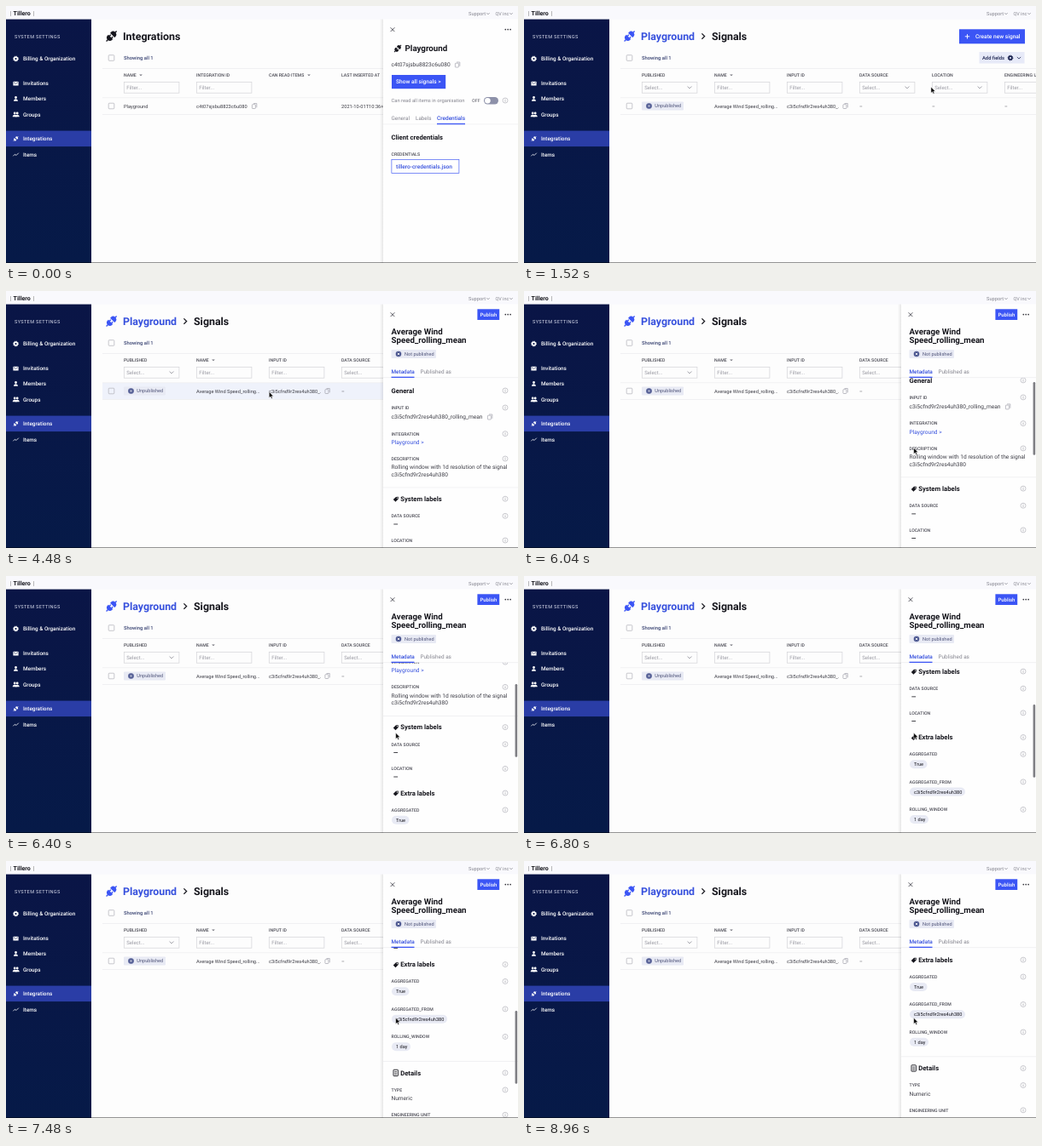
An HTML page for the animation above (9000 ms loop, 600 by 302 pixels).

```html
<!DOCTYPE html>
<html lang="en">
<head>
<meta charset="utf-8">
<title>Publishing a signal</title>
<style>
  html, body { margin: 0; width: 100%; height: 100%; overflow: hidden; background: #fdfdfd; }
  svg { display: block; width: 100vw; height: 100vh; }
  text { font-family: Roboto, Arial, sans-serif; text-rendering: geometricPrecision; white-space: pre; }
</style>
</head>
<body>
<svg id="stage" viewBox="0 0 600 302"></svg>
<script>
const LOOP = 9000, PANEL_X = 442, PANEL_W = 158;
const BLUE = '#3b55f5', LINK = '#3650dd', INK = '#16161d', BODY = '#3d3d46', GREY = '#85858f', RULE = '#ebebee', CHIP = '#e8eaf4';

// ---- drawing helpers (y is the vertical middle of the capitals) ----
const text = (x, y, str, size = 5.7, fill = BODY, weight = 400, spacing = 0) =>
  `<text x="${x}" y="${y + size * 0.355}" font-size="${size}" fill="${fill}" font-weight="${weight}" letter-spacing="${spacing}">${str.replace(/&/g, '&amp;').replace(/>/g, '&gt;')}</text>`;
const rect = (x, y, w, h, fill, extra = '') =>
  `<rect x="${x}" y="${y}" width="${w}" height="${h}" fill="${fill}" ${extra}/>`;
const box = (x, y, w, h, stroke, width = 0.7, r = 0) =>
  rect(x, y, w, h, 'none', `stroke="${stroke}" stroke-width="${width}" rx="${r}"`);
const line = (d, stroke, width = 0.8) =>
  `<path d="${d}" fill="none" stroke="${stroke}" stroke-width="${width}"/>`;
const fillPath = (d, fill) => `<path d="${d}" fill="${fill}"/>`;
const dot = (x, y, r, fill) => `<circle cx="${x}" cy="${y}" r="${r}" fill="${fill}"/>`;
const at = (x, y, inner, scale = 1, turn = 0) =>
  `<g transform="translate(${x} ${y}) rotate(${turn}) scale(${scale})">${inner}</g>`;

const rule = (x, y, w) => rect(x, y, w, 0.7, RULE);
const label = (x, y, str) => text(x, y, str, 5.2, '#4b4b55', 500);
const chevron = (x, y, color, s = 1) => line(`M${x - 2 * s} ${y - s}l${2 * s} ${2 * s}l${2 * s} ${-2 * s}`, color);
const caret = x => fillPath(`M${x - 1.8} 80.4h3.6l-1.8 1.8z`, '#6f6f78');
const checkbox = y => box(120.2, y - 3.3, 6.6, 6.6, '#b0b0b8', 0.7, 0.8);
const cross = (x, y, r, color, w) =>
  line(`M${x - r} ${y - r}l${2 * r} ${2 * r}M${x + r} ${y - r}l${-2 * r} ${2 * r}`, color, w);
const info = y => `<circle cx="585" cy="${y}" r="3" fill="none" stroke="#a8a8b1" stroke-width=".6"/>` +
  rect(584.7, y - 0.6, 0.6, 2.2, '#8e8e99') + rect(584.7, y - 1.7, 0.6, 0.6, '#8e8e99');
const copy = (x, y) => box(x - 2.6, y - 1.8, 4, 4.8, '#a2a2ac', 0.7, 0.6) +
  line(`M${x - 1} ${y - 3}h3.8v4.8`, '#a2a2ac', 0.7);
const badge = (x, y) => dot(x, y, 3.3, '#4f5a92') + cross(x, y, 1.2, '#fff', 0.8);
const gear = (x, y, color) => `<g fill="none" stroke="${color}"><circle cx="${x}" cy="${y}" r="1.9" stroke-width="1.6"/>` +
  `<circle cx="${x}" cy="${y}" r="2.9" stroke-width="1" stroke-dasharray="1.2 1.078"/></g>`;
const plug = (x, y, color, s = 1) => at(x, y,
  fillPath('M-1.3 -3.7V3.7H-2.4A3.7 3.7 0 0 1 -2.4 -3.7Z M1.6 -3.7V3.7H2.8A3.7 3.7 0 0 0 2.8 -3.7Z', color) +
  line('M-8.4 0H-5M5.4 0H8.6M-1.6 -1.7H.7M-1.6 1.7H.7', color, 1.4), s, -45);
const tag = (x, y) => at(x, y, fillPath('M-3.2 -1.9H1.3L3.4 0L1.3 1.9H-3.2Z', INK) + dot(1.4, 0, 0.6, '#fff'), 1, -45);
const person = (x, y) => dot(x, y - 1.5, 1.4, '#fff') + fillPath(`M${x - 2.5} ${y + 2.7}a2.5 2.5 0 0 1 5 0z`, '#fff');
const field = (x, kind) => box(x + 0.3, 89.3, 64.6, 12.9, '#d3d3d8') +
  text(x + 3.2, 95.6, kind + '...', 6, '#9b9ba4') +
  (kind === 'Select' ? chevron(x + 56, 95.7, '#8b8b95', 1.2) : '');

// ---- fixed chrome ----
function chrome() {
  const items = [[62, 'Billing & Organization'], [91, 'Invitations'], [109, 'Members'], [127.5, 'Groups'], [156, 'Integrations'], [174.5, 'Items']];
  return rect(0, 0, 600, 15.6, '#f9f9fd') +
    text(4.7, 8.5, '|', 7, '#777') + text(8.6, 8.5, 'Tillero', 7, INK, 700) + text(31.8, 8.5, '|', 7, '#777') +
    text(542, 9, 'Support', 5.7, GREY) + chevron(565, 9, GREY, 0.8) +
    text(573.5, 9, 'QV inc', 5.5, GREY) + chevron(592, 9, GREY, 0.8) +
    rect(0, 15.6, 100, 286.4, 'url(#navy)') + rect(0, 146.6, 100, 18.5, '#2a3da6') +
    text(10, 36, 'SYSTEM SETTINGS', 5.6, '#d5d9ea', 400, 0.33) +
    items.map(([y, s]) => text(20, y, s, 6.36, '#fff', 500)).join('') +
    gear(11.5, 62, '#fff') +
    rect(8.4, 88.7, 6.2, 4.8, '#fff', 'rx=".5"') + line('M8.6 89.4l2.9 2l2.9 -2', '#0a1747', 0.6) +
    person(11.5, 109) + person(10.2, 127.5) + person(13.2, 127.5) +
    plug(11.5, 156, '#fff', 0.46) + line('M8.4 176.3l2 -2l1.6 1.2l2.8 -2.8', '#fff', 0.8);
}

const tableFrame = () => checkbox(61) + text(138, 60.9, 'Showing all 1', 5.8, '#3c4674', 500) +
  rule(113, 73, 487) + rule(113, 107.5, 487) + rule(113, 127.2, 487) + checkbox(117.5);
const column = (x, str) => label(x, 81.3, str);

function integrationsPage() {
  return plug(123.5, 35.5, INK) + text(137, 35.5, 'Integrations', 12.4, INK, 700) + tableFrame() +
    column(138, 'NAME') + caret(158) + column(223, 'INTEGRATION ID') +
    column(308, 'CAN READ ITEMS') + caret(355) + column(393, 'LAST INSERTED AT') +
    field(138, 'Filter') + field(223, 'Filter') +
    text(138, 117.5, 'Playground') + text(223, 117.5, 'c4t07sjsbu8823c6u080') + copy(291, 117.5) +
    text(393, 117.5, '2021-10-01T10:36+02:00');
}

function signalsPage() {
  const heads = ['PUBLISHED', 'NAME', 'INPUT ID', 'DATA SOURCE', 'LOCATION', 'ENGINEERING UNIT'];
  const kinds = ['Select', 'Filter', 'Filter', 'Select', 'Select', 'Filter'];
  return rect(113, 108, 487, 19.2, '#eff2fb', 'id="hover"') +
    plug(123.5, 35.5, BLUE) + text(137, 35.5, 'Playground', 12.35, LINK, 700) +
    line('M208.4 32.4l3.2 3.2l-3.2 3.2', INK, 1.3) + text(220, 35.5, 'Signals', 12.4, INK, 700) +
    rect(510, 27.3, 77, 17, BLUE) + line('M516.8 35.8h5.4M519.5 33.1v5.4', '#fff', 0.9) +
    text(529, 35.8, 'Create new signal', 6.6, '#fff', 500) +
    rect(533.5, 54, 53, 13.5, '#e7eaf8') + text(537, 60.8, 'Add fields', 5.8, '#1b2350', 500) +
    gear(570, 61, '#1b2350') + chevron(580, 61, '#1b2350', 1.1) + tableFrame() +
    heads.map((h, i) => column(138 + 85 * i, h) + field(138 + 85 * i, kinds[i])).join('') + caret(243) +
    rect(138, 112.5, 49, 10, CHIP, 'rx="1"') + badge(146.5, 117.5) + text(153.3, 117.5, 'Unpublished', 5.6, '#50557a') +
    text(223, 117.5, 'Average Wind Speed_rolling...') + text(308, 117.5, 'c3i5cfnd9r2res4uh380_.') + copy(376.5, 117.5) +
    [393, 478, 563].map(x => text(x, 117.5, '–')).join('');
}

// ---- side panels ----
const panelBase = () => rect(PANEL_X - 4, 15.6, 4, 286.4, 'url(#shade)') + rect(PANEL_X, 15.6, PANEL_W, 286.4, '#fefefe') +
  cross(453, 27.7, 2.4, '#33333b', 0.8) + [585.3, 588.2, 591.1].map(x => dot(x, 27.6, 0.85, '#33333b')).join('');

function integrationPanel() {
  return panelBase() + plug(459, 50, INK, 0.68) + text(467.5, 49.8, 'Playground', 9.75, INK, 700) +
    text(451.5, 69, 'c4t07sjsbu8823c6u080', 6.6) + copy(529, 69) +
    rect(452, 81, 63.2, 16.2, BLUE) + text(457, 89, 'Show all signals >', 6.6, '#fff', 500) +
    text(451.5, 111, 'Can read all items in organisation', 5.8, GREY) + text(546, 111, 'OFF', 5.4, '#5a5a64') +
    rect(560, 107, 17, 8.4, '#8d91a9', 'rx="4.2"') + dot(564.4, 111.2, 3.3, '#fff') + info(111) +
    text(451.5, 131.5, 'General', 6.3, GREY) + text(480, 131.5, 'Labels', 6.3, GREY) +
    text(505, 131.5, 'Credentials', 6.5, LINK, 500) + rule(PANEL_X, 138.6, PANEL_W) + rect(505, 137.9, 33, 1.3, BLUE) +
    text(451.5, 154.3, 'Client credentials', 7.7, INK, 700) + label(451.5, 174, 'CREDENTIALS') +
    box(451.9, 180.4, 79, 16.1, BLUE, 0.65) + text(457, 188.5, 'tillero-credentials.json', 6.6, LINK, 500);
}

function metadata() {
  const head = (y, s, x = 462.2) => text(x, y, s, 7.7, INK, 700) + info(y);
  const key = (y, s) => label(451.5, y, s) + info(y);
  const chip = (y, s, w) => rect(452, y - 5, w, 10, CHIP, 'rx="5"') + text(457, y, s, 5.6, INK);
  const value = (y, s, color) => text(451.5, y, s, 6.6, color);
  const empty = y => rect(454.3, y - 0.4, 4.8, 0.8, INK);
  return head(117, 'General', 451.5) +
    key(137, 'INPUT ID') + value(148, 'c3i5cfnd9r2res4uh380_rolling_mean') + copy(567, 148) +
    key(167.7, 'INTEGRATION') + value(177.7, 'Playground >', LINK) +
    key(197, 'DESCRIPTION') + value(207, 'Rolling window with 1d resolution of the signal') + value(215.3, 'c3i5cfnd9r2res4uh380') +
    [230.6, 435].map(y => rule(PANEL_X, y, PANEL_W)).join('') +
    tag(457.4, 244.2) + head(244.2, 'System labels') +
    key(264.3, 'DATA SOURCE') + empty(274) + key(293, 'LOCATION') + empty(302.6) +
    tag(457.4, 321.6) + head(321.6, 'Extra labels') +
    key(341.5, 'AGGREGATED') + chip(353.4, 'True', 20.5) +
    key(374, 'AGGREGATED_FROM') + chip(385.7, 'c3i5cfnd9r2res4uh380', 65) +
    key(406.5, 'ROLLING_WINDOW') + chip(418.2, '1 day', 22) +
    box(454, 445.3, 5.4, 7.4, INK, 0.9, 0.6) + line('M455.3 447.5h2.8M455.3 449.2h2.8M455.3 450.9h2.8', INK, 0.7) +
    head(449, 'Details') + key(469, 'TYPE') + value(479, 'Numeric') + key(498.3, 'ENGINEERING UNIT');
}

function signalPanel() {
  return panelBase() + rect(552.4, 21.3, 25.8, 12.7, BLUE) + text(555.4, 27.5, 'Publish', 6, '#fff', 500) +
    text(451.5, 47.1, 'Average Wind', 9.72, INK, 700) + text(451.5, 57.6, 'Speed_rolling_mean', 9.72, INK, 700) +
    rect(451.5, 69, 52.5, 10, CHIP, 'rx="1"') + badge(460, 74) + text(467, 74, 'Not published', 5.6, '#50557a') +
    text(451.5, 94.3, 'Metadata', 6.4, LINK, 500) + text(485.5, 94.3, 'Published as', 6.4, GREY) +
    `<g clip-path="url(#view)"><g id="scroll">${metadata()}</g></g>` +
    rule(PANEL_X, 101.4, PANEL_W) + rect(451.5, 100.7, 27, 1.3, BLUE) +
    rect(596.6, 0, 2.6, 85.7, '#7d7d82', 'rx="1.3" id="thumb"');
}

const arrow = '<path id="arrow" d="M0 0V7.1L1.7 5.6L2.8 8.1L4 7.6L2.9 5.2H5.1Z" fill="#000" stroke="#fff" stroke-width=".5"/>';
const hand = '<path id="hand" d="M-.8 .6Q0 -.4 .8 .6V3Q1.6 2.5 2.3 3.2Q3.1 2.8 3.7 3.5Q4.6 3.3 4.8 4.3V5.6Q4.5 6.9 4 8H.1Q-1.4 6.3 -2.7 4.8Q-2.4 3.7 -.8 4.9Z" fill="#fff" stroke="#000" stroke-width=".7"/>';

const stage = document.getElementById('stage');
stage.innerHTML = `<defs>
  <linearGradient id="navy" x2="0" y2="1"><stop stop-color="#0a1546"/><stop offset="1" stop-color="#061a48"/></linearGradient>
  <linearGradient id="shade"><stop stop-color="#000" stop-opacity="0"/><stop offset="1" stop-color="#000" stop-opacity=".09"/></linearGradient>
  <clipPath id="view"><rect x="442" y="101.5" width="158" height="201"/></clipPath></defs>` +
  rect(0, 0, 600, 302, '#fdfdfd') +
  `<g id="integrations">${integrationsPage()}</g><g id="signals">${signalsPage()}</g>` + chrome() +
  `<g id="panelA">${integrationPanel()}</g><g id="panelB">${signalPanel()}</g>` +
  rect(0, 301, 600, 1, '#000', 'opacity=".42"') + `<g id="cursor">${arrow}${hand}</g>`;

const el = {};
stage.querySelectorAll('[id]').forEach(n => el[n.id] = n);

// ---- motion ----
const CLICK = 1300, OPEN = 4220;
const pathX = [[200, 502], [1080, 481], [1300, 480], [2000, 470], [2400, 470], [2800, 324], [3000, 308.3], [4840, 308.3], [5320, 481], [5680, 456.7]];
const pathY = [[200, 303], [1080, 89], [1300, 89], [2000, 115], [2400, 115], [2800, 112], [3000, 118.5], [4840, 118.5], [5320, 174], [5680, 184.3]];
const scrollKeys = [[5880, 0], [6040, 12], [6800, 132], [7480, 200], [7600, 205.5]];

const clamp = v => Math.min(1, Math.max(0, v));
const easeOut = v => 1 - (1 - clamp(v)) ** 3;

// Monotone cubic interpolation through [time, value] pairs
function track(keys, t) {
  const last = keys.length - 1;
  if (t <= keys[0][0]) return keys[0][1];
  if (t >= keys[last][0]) return keys[last][1];
  const i = keys.findIndex(k => k[0] > t) - 1;
  const slope = j => (keys[j + 1][1] - keys[j][1]) / (keys[j + 1][0] - keys[j][0]);
  const tangent = j => {
    if (j === 0 || j === last) return 0;
    const a = slope(j - 1), b = slope(j);
    return a * b <= 0 ? 0 : 2 * a * b / (a + b);
  };
  const [t0, v0] = keys[i], [t1, v1] = keys[i + 1], span = t1 - t0, u = (t - t0) / span, w = 1 - u;
  return v0 * (1 + 2 * u) * w * w + tangent(i) * span * u * w * w +
    v1 * u * u * (3 - 2 * u) - tangent(i + 1) * span * u * u * w;
}

const show = (node, on) => node.setAttribute('display', on ? 'inline' : 'none');
const move = (node, x, y) => node.setAttribute('transform', `translate(${x} ${y})`);

function render(t) {
  const onSignals = t >= CLICK, opened = t >= OPEN + 20;
  const outA = easeOut((t - CLICK) / 260), inB = easeOut((t - OPEN) / 250);
  const x = track(pathX, t), y = track(pathY, t), scroll = track(scrollKeys, t);

  show(el.integrations, !onSignals);
  show(el.signals, onSignals);
  show(el.panelA, outA < 1);
  show(el.panelB, inB > 0);
  move(el.panelA, outA * (PANEL_W + 8), 0);
  move(el.panelB, (1 - inB) * (PANEL_W + 8), 0);

  move(el.scroll, 0, -scroll);
  el.thumb.setAttribute('y', 102.6 + scroll * 0.367);
  el.thumb.setAttribute('opacity', clamp((t - 5900) / 60) * (1 - clamp((t - 8620) / 320)));

  const onRow = onSignals && y > 108 && y < 127 && !(opened && x > PANEL_X);
  const onButton = !onSignals && x > 451 && x < 515 && y > 80 && y < 97;
  const pointing = onButton || (onRow && !opened);
  show(el.hover, onRow);
  show(el.cursor, t >= 200);
  show(el.hand, pointing);
  show(el.arrow, !pointing);
  move(el.cursor, x, y);
}

const start = performance.now();
function tick() {
  render((performance.now() - start) % LOOP);
  requestAnimationFrame(tick);
}
tick();
</script>
</body>
</html>
```
